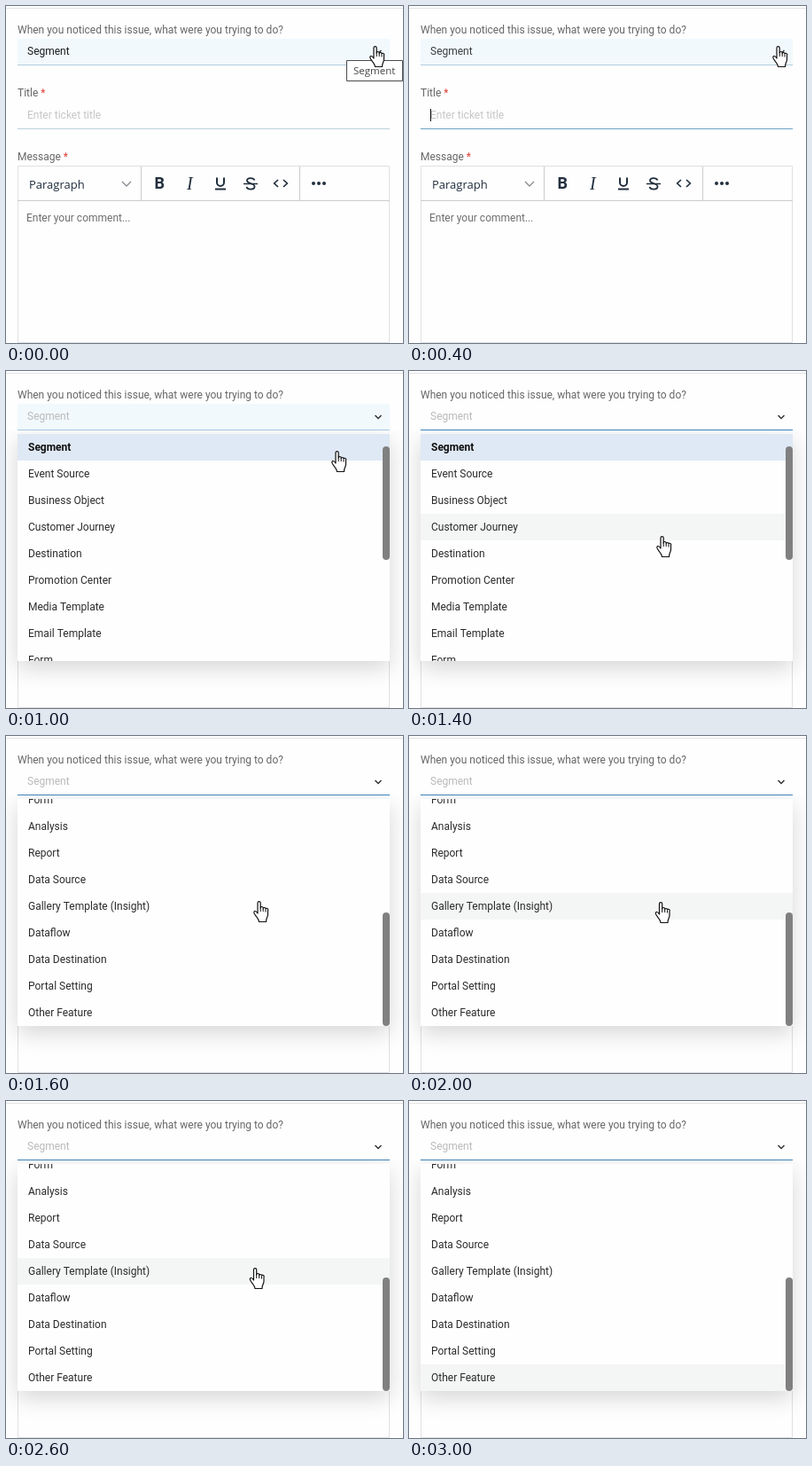
Animation of 448 by 380 pixels, one loop 3400 ms. Source, as an HTML page with a canvas:

```html
<!DOCTYPE html>
<html lang="en">
<head>
<meta charset="utf-8">
<title>Ticket form</title>
<style>
html, body { margin: 0; width: 100%; height: 100%; overflow: hidden; background: #fefefe; }
canvas { display: block; width: 448px; height: 380px; }
</style>
</head>
<body>
<canvas id="stage" width="448" height="380"></canvas>
<script>
const ctx = document.getElementById('stage').getContext('2d');
const LOOP = 3400;
const ROW = 30;
const LIST = { x: 13, y: 71, w: 420, h: 256 };
const ITEMS = ['Segment', 'Event Source', 'Business Object', 'Customer Journey', 'Destination',
  'Promotion Center', 'Media Template', 'Email Template', 'Form', 'Analysis', 'Report',
  'Data Source', 'Gallery Template (Insight)', 'Dataflow', 'Data Destination',
  'Portal Setting', 'Other Feature'];
const MAX_SCROLL = ITEMS.length * ROW - LIST.h;

// Pointer positions: start time, left, top
const POINTER = [
  [0, 410, 45], [1000, 367, 90], [1200, 279, 186], [1800, 278, 186],
  [2000, 277.5, 187], [2200, 277, 188], [2400, 275.5, 188], [2600, 274.5, 188]
];
const POINTER_END = 2800;

const HAND = new Path2D('M5 14V2.2A1.6 1.6 0 0 1 8.2 2.2V8A1.5 1.5 0 0 1 11.2 8V8.8' +
  'A1.4 1.4 0 0 1 14 9A1.4 1.4 0 0 1 16.5 10.4V15.5C16.5 18 14.5 19 14.5 23.5H6.5' +
  'C6.5 20 .8 15.5 .8 13C.8 11 3 10.6 5 14Z');
const FINGERS = new Path2D('M8.2 7.5V12M11.2 8.5V12M14 9.5V12.5');

function rect(x, y, w, h, color) {
  ctx.fillStyle = color;
  ctx.fillRect(x, y, w, h);
}

function text(str, x, base, color, font = '12px Roboto, sans-serif') {
  ctx.font = font;
  ctx.fillStyle = color;
  ctx.fillText(str, x, base);
}

function stroke(d, color, width) {
  ctx.strokeStyle = color;
  ctx.lineWidth = width;
  ctx.stroke(new Path2D(d));
}

function label(str, base, starX) {
  text(str, 13, base, '#666');
  if (starX) text('*', starX, base, '#e0403a');
}

function drawSelect(t) {
  const open = t >= 600;
  const hover = t < 1200;
  label('When you noticed this issue, what were you trying to do?', 31);
  if (hover) rect(13, 37, 420, 29, '#f1f9fd');
  rect(13, 66, 420, 1, !hover ? '#3d82b8' : open ? '#a6c5e4' : '#b2cddd');
  text('Segment', 24, 55, open ? '#bababa' : t < 400 ? '#1c1c1c' : '#3c3c3c');
  stroke('M416.5 50L420 53.5L423.5 50', '#333', 1.5);
}

function drawTitle(t) {
  const focus = t >= 400;
  label('Title', 102, 39.3);
  text('Enter ticket title', 24, 127, '#c6c6c6');
  rect(13, 138, 420, 1, focus ? '#6aa3c8' : '#b9d0dc');
  if (focus) rect(24, 116, 1, 14, '#111');
}

function drawToolbar() {
  const ink = '#222f3e';
  text('Paragraph', 26, 206, ink, '13px "Open Sans", "Noto Sans", sans-serif');
  stroke('M131 198L136 203L141 198', '#8a8e94', 1.4);
  text('B', 167.5, 206, ink, 'bold 18px Roboto, sans-serif');
  text('I', 204, 207, ink, 'italic 20px "Liberation Serif", serif');
  stroke('M238 193.5V199A4 4 0 0 0 246 199V193.5M236 206.5H248', ink, 2);
  stroke('M280.5 196.5C279.5 193.5 272 193 272 197C272 200.5 280.5 199.5 280.5 203.5' +
    'C280.5 207.5 272.5 207.5 271.5 204', ink, 1.8);
  stroke('M268 200.5H284', ink, 1.5);
  stroke('M307 196L302.7 200L307 204M313 196L317.3 200L313 204', ink, 1.7);
  ctx.fillStyle = ink;
  for (const x of [347, 353, 359]) {
    ctx.beginPath();
    ctx.arc(x, 200, 2, 0, Math.PI * 2);
    ctx.fill();
  }
}

function drawEditor() {
  label('Message', 174, 64.7);
  stroke('M13.5 180.5H432.5V379.5H13.5Z', '#e0e0e0', 1);
  stroke('M13 219.5H433M152.5 181V219M331.5 181V219', '#cccccc', 1);
  drawToolbar();
  text('Enter your comment...', 23, 243, '#6e6e6e');
}

function hoveredRow(t) {
  if (t >= 2800) return 16;
  if (t >= 1800) return 12;
  return t >= 1200 && t < 1600 ? 3 : -1;
}

function drawList(t) {
  const scrolled = t >= 1600;
  const offset = scrolled ? MAX_SCROLL : 0;
  const hover = hoveredRow(t);
  const { x, y, w, h } = LIST;

  ctx.save();
  ctx.beginPath();
  ctx.rect(0, 67, 448, 313);
  ctx.clip();
  ctx.shadowColor = 'rgba(0,0,0,0.16)';
  ctx.shadowBlur = 24;
  ctx.shadowOffsetY = 8;
  rect(x, y, w, h, '#fefefe');
  ctx.restore();

  ctx.save();
  ctx.beginPath();
  ctx.rect(x, y, w, h);
  ctx.clip();
  ITEMS.forEach((item, i) => {
    const top = y + i * ROW - offset;
    if (i === 0) rect(x, top, w, ROW, '#dfe9f5');
    else if (i === hover) rect(x, top, w, ROW, '#f4f5f5');
    text(item, 25, top + 19, i ? '#2b2b2b' : '#111',
      (i ? '' : 'bold ') + '12px Roboto, sans-serif');
  });
  ctx.fillStyle = '#808080';
  ctx.beginPath();
  ctx.roundRect(425, scrolled ? 199 : 85, 8, 128, 4);
  ctx.fill();
  ctx.restore();
}

function drawTooltip(alpha) {
  ctx.globalAlpha = alpha;
  rect(384, 61, 64, 24, '#fff');
  stroke('M384.5 61.5H447.5V84.5H384.5Z', '#4a4a4a', 1);
  text('Segment', 392, 77, '#444', '11.5px "Open Sans", "Noto Sans", sans-serif');
  ctx.globalAlpha = 1;
}

function drawPointer(t) {
  if (t >= POINTER_END) return;
  const [, x, y] = POINTER.filter(p => p[0] <= t).pop();
  ctx.save();
  ctx.translate(x, y);
  ctx.fillStyle = '#fff';
  ctx.fill(HAND);
  ctx.strokeStyle = '#111';
  ctx.lineWidth = 1.2;
  ctx.lineJoin = 'round';
  ctx.stroke(HAND);
  ctx.lineWidth = 1;
  ctx.stroke(FINGERS);
  ctx.restore();
}

function draw(t) {
  rect(0, 0, 448, 380, '#fefefe');
  rect(0, 2, 448, 1, '#e3e3e3');
  drawSelect(t);
  drawTitle(t);
  drawEditor();
  if (t >= 600) drawList(t);
  if (t < 400) drawTooltip(t < 200 ? 1 : 0.45);
  drawPointer(t);
}

const start = performance.now();
function tick() {
  draw((performance.now() - start) % LOOP);
  requestAnimationFrame(tick);
}
tick();
</script>
</body>
</html>
```
